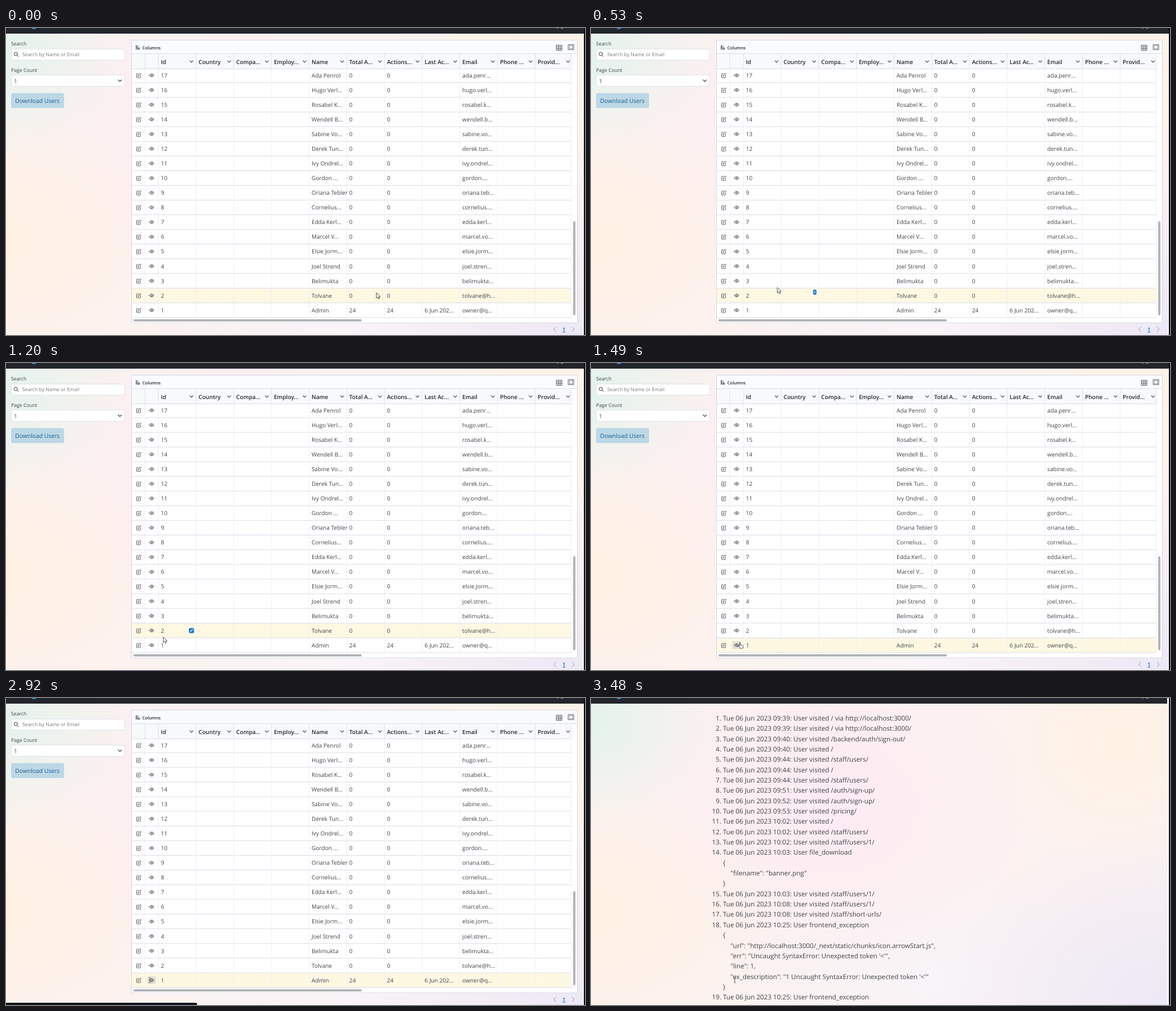
An HTML page for the animation above (3.88 s loop, 1027 by 545 pixels).

```html
<!DOCTYPE html>
<html lang="en">
<head>
<meta charset="utf-8">
<title>User activity</title>
<style>
html, body { margin: 0; width: 100%; height: 100%; overflow: hidden; }
#stage {
  position: relative; width: 1027px; height: 545px; overflow: hidden;
  background:
    radial-gradient(230px 190px at 0 40px, #e4f3ec, #e4f3ec00),
    radial-gradient(330px 230px at 0 380px, #fff0e2, #fff0e200),
    radial-gradient(380px 300px at 420px 190px, #fdebf3, #fdebf300),
    radial-gradient(260px 230px at 940px 80px, #fff2e4, #fff2e400),
    radial-gradient(420px 330px at 1027px 545px, #ece8f6, #ece8f600),
    radial-gradient(380px 200px at 620px 500px, #f8f4f8, #f8f4f800),
    #fcf2f0;
}
svg { position: absolute; left: 0; top: 0; }
text { font-family: "Open Sans", "Noto Sans", sans-serif; fill: #40434a; white-space: pre; text-rendering: geometricPrecision; }
.line { fill: none; stroke: #3a3d44; stroke-linecap: round; stroke-linejoin: round; }
.cell { font-size: 10.15px; }
.head { font-size: 10.15px; font-weight: 600; fill: #25282e; }
.small { font-size: 8.7px; }
.log { font-size: 11.67px; }

.users, .logs, .hover, .cursor, .arrow, .hand, .beam, .spot, .eyebg, .status, .logo, .pill {
  animation: 3880ms linear infinite;
}
.users { animation-name: users; }
.logs { animation-name: logs; }
.hover { animation-name: hover; }
.cursor { animation-name: move; }
.arrow { animation-name: arrow; }
.hand { animation-name: hand; }
.beam { animation-name: beam; }
.spot { animation-name: spot; }
.eyebg { animation-name: eyebg; }
.status { animation-name: bar; position: absolute; left: 0; top: 541px; height: 4px; background: #12141a; border-radius: 0 3px 0 0; }
.logo { animation-name: logo; }
.pill { transform-box: fill-box; transform-origin: center; }
.out { animation-name: pill-out; }
.in { animation-name: pill-in; }
.users, .logs, .hover, .arrow, .hand, .beam, .spot, .eyebg, .logo { animation-timing-function: step-end; }

@keyframes users { 0% { visibility: visible } 77.31%, 100% { visibility: hidden } }
@keyframes logs { 0% { visibility: hidden } 77.31%, 100% { visibility: visible } }
@keyframes hover {
  0% { transform: translateY(-26.06px) }
  3.34% { transform: translateY(-52.12px) }
  13.65% { transform: translateY(-26.06px) }
  32.7%, 100% { transform: none }
}
@keyframes move {
  0% { transform: translate(657px, 470px) }
  3.34% { transform: translate(657px, 470px); animation-timing-function: steps(2, jump-both) }
  6.95%, 13.64% { transform: translate(540px, 452px) }
  13.65% { transform: translate(330.5px, 460.5px); animation-timing-function: steps(7, jump-end) }
  26.02%, 29.37% { transform: translate(282px, 485px) }
  29.38% { transform: translate(281px, 486px); animation-timing-function: step-end }
  30.92% { transform: translate(279px, 486.5px); animation-timing-function: steps(6, jump-end) }
  42% { transform: translate(258px, 500px) }
  43.8% { transform: translate(258px, 500px); animation-timing-function: steps(5, jump-both) }
  52.82%, 100% { transform: translate(255px, 501px) }
}
@keyframes arrow { 0% { opacity: 1 } 38%, 100% { opacity: 0 } }
@keyframes hand { 0% { opacity: 0 } 38% { opacity: 1 } 69.84%, 100% { opacity: 0 } }
@keyframes beam { 0% { opacity: 0 } 69.84%, 100% { opacity: 1 } }
@keyframes eyebg { 0% { opacity: 0 } 38%, 100% { opacity: 1 } }
@keyframes spot { 0% { opacity: 0 } 49.2% { opacity: .85 } 69.84%, 100% { opacity: 0 } }
@keyframes logo { 0% { opacity: 1 } 77.31% { opacity: .12 } 78.6%, 100% { opacity: 1 } }
@keyframes bar {
  0% { opacity: 0; width: 107px }
  43.8% { opacity: 0; width: 107px; animation-timing-function: steps(3, jump-both) }
  49.2% { opacity: 1; width: 107px }
  69.84% { opacity: 1; width: 107px; animation-timing-function: steps(3, jump-both) }
  75.25% { opacity: 1; width: 339px }
  84.27% { opacity: 1; width: 339px; animation-timing-function: steps(3, jump-both) }
  89.68%, 100% { opacity: 0; width: 339px }
}
@keyframes pill-out {
  0%, 13.64% { transform: scaleX(0) }
  13.65% { transform: scaleX(.65); animation-timing-function: steps(2, jump-end) }
  17.2%, 100% { transform: scaleX(0) }
}
@keyframes pill-in {
  0% { transform: scaleX(0) }
  15.4% { transform: scaleX(0); animation-timing-function: steps(3, jump-end) }
  20.9%, 32.69% { transform: scaleX(1) }
  32.7%, 100% { transform: scaleX(0) }
}
</style>
</head>
<body>
<div id="stage">
  <svg class="users" width="1027" height="545" id="users"></svg>
  <svg class="logs" width="1027" height="545" id="logs"></svg>
  <svg width="1027" height="545" id="top"></svg>
  <div class="status"></div>
</div>
<script>
const FIRST_ROW = 501, ROW = 26.06, COL = 66.83;
const colX = i => 270.3 + i * COL;
const esc = s => String(s).replace(/&/g, '&amp;').replace(/</g, '&lt;');
const text = (x, y, s, cls, extra = '') => `<text x="${x}" y="${y}" class="${cls}" ${extra}>${esc(s)}</text>`;
const rect = (x, y, w, h, fill, extra = '') => `<rect x="${x}" y="${y}" width="${w}" height="${h}" fill="${fill}" ${extra}/>`;
const path = (d, w = 1, extra = '') => `<path class="line" d="${d}" stroke-width="${w}" ${extra}/>`;
const chevron = (x, y, r = 3) => path(`M${x - r} ${y - r / 2}l${r} ${r}l${r} ${-r}`, 1.1);

const people = [
  ['Admin', 'owner@q...'], ['Tolvane', 'tolvane@h...'], ['Belimukta', 'belimukta...'],
  ['Joel Strend', 'joel.stren...'], ['Elsie Jorm...', 'elsie.jorm...'], ['Marcel V...', 'marcel.vo...'],
  ['Edda Kerl...', 'edda.kerl...'], ['Cornelius...', 'cornelius....'], ['Oriana Tebler', 'oriana.teb...'],
  ['Gordon ...', 'gordon....'], ['Ivy Ondrel...', 'ivy.ondrel...'], ['Derek Tun...', 'derek.tun...'],
  ['Sabine Vo...', 'sabine.vo...'], ['Wendell B...', 'wendell.b...'], ['Rosabel K...', 'rosabel.k...'],
  ['Hugo Verl...', 'hugo.verl...'], ['Ada Penrol', 'ada.penr...']
];
const heads = ['Id', 'Country', 'Compa...', 'Employ...', 'Name', 'Total A...', 'Actions...', 'Last Ac...', 'Email', 'Phone ...', 'Provid...'];

const pill = (x, y, cls) => `<g class="pill ${cls}">${rect(x - 4.5, y - 4.5, 9, 9, '#1976cf', 'rx="2.6"')}
  <path d="M${x - 2} ${y + 2}l4 -4" stroke="#fff" stroke-width="1.2"/></g>`;

const editIcon = y => path(`M235 ${y - 3}h-2.3q-1.2 0 -1.2 1.2v4.8q0 1.2 1.2 1.2h4.8q1.2 0 1.2 -1.2v-2.2M234 ${y + 1.6}l.4 -1.8l3.8 -3.8l1.4 1.4l-3.8 3.8z`, .85);
const eyeIcon = y => path(`M254 ${y}q4.4 -5.6 8.8 0q-4.4 5.6 -8.8 0z`, .8) +
  `<circle class="line" cx="258.4" cy="${y}" r="1.5" stroke-width=".9"/>`;

function sidebar() {
  const box = 'stroke="#dfe2e8" rx="3"';
  return text(9, 30.5, 'Search', 'small') + text(9, 77.5, 'Page Count', 'small') +
    rect(9.5, 37.5, 201, 19.5, '#fff', box) + rect(9.5, 83.5, 201, 20, '#fff', box) +
    `<circle class="line" cx="17.3" cy="46" r="3"/>` + path('M19.6 48.4l2.2 2.3') +
    text(29, 50, 'Search by Name or Email', 'small', 'style="fill:#73777e"') +
    text(14, 97.5, '1', 'cell') + chevron(202, 93.5) +
    rect(9, 115.5, 94, 26.5, '#bcd7e5', 'rx="3.5"') +
    text(16.3, 132.7, 'Download Users', 'cell', 'style="fill:#1b6098;font-size:10.3px;font-weight:500"');
}

function toolbar() {
  return rect(222.5, 21.5, 791, 501.5, '#fafbfd', 'stroke="#d3d8e2"') +
    path('M230.5 32h4.5M230.5 34.5h3M230.5 37h2.5M231 31v7', .9) +
    `<circle class="line" cx="235.3" cy="36.6" r="1.5" stroke-width="1.1"/>` +
    text(241.7, 37.6, 'Columns', 'head', 'style="font-size:7.7px"') +
    path('M976.5 30.5h9.5v9h-9.5zM976.5 33h9.5M976.5 36.3h9.5M979.7 33v6.5M982.9 33v6.5', .8) +
    path('M997.5 29.5h9.5v9h-9.5zM999.4 33v-1.6h1.8M1005.1 33v-1.6h-1.8M999.4 35v1.6h1.8M1005.1 35v1.6h-1.8', .8);
}

function grid() {
  let s = rect(223, 46, 779, 26, '#f8f9fb') + rect(223, 72, 779, 442, '#fff') + rect(1002, 46, 11, 476, '#fff') + rect(223, 514, 790, 8.5, '#fff');
  s += `<g class="hover">${rect(223, FIRST_ROW - 13, 779, 26, '#fef8e3')}</g>`;
  s += `<g class="eyebg">${rect(250.5, 493.5, 15.5, 14.5, '#e4e1d6', 'rx="3"')}</g>`;
  const verticals = [246.5, ...heads.map((_, i) => colX(i)), 1002.5];
  s += path(verticals.map(x => `M${x} 72V514`).join(''), 1, 'style="stroke:#edf0f6"');
  s += path(verticals.map(x => `M${x} 46V72`).join(''), 1, 'style="stroke:#dce1ea"');
  s += path('M223 45.5H1013M223 72.5H1002' + people.map((_, i) => `M223 ${FIRST_ROW + 13 - i * ROW}H1002`).join(''), 1, 'style="stroke:#d8dde8"');
  heads.forEach((h, i) => {
    s += text(colX(i) + 4.4, 63.5, h, 'head') + chevron(i < 10 ? colX(i) + 58.7 : 997, 59.5, 2.8);
  });
  people.forEach(([name, mail], i) => {
    const y = FIRST_ROW - i * ROW, n = i ? 0 : 24;
    const put = (col, v) => text(colX(col) + 4.4, y + 3.7, v, 'cell');
    s += editIcon(y) + eyeIcon(y) + put(0, i + 1) + put(4, name) + put(5, n) + put(6, n) + put(8, mail);
    if (!i) s += put(7, '6 Jun 202...');
  });
  s += pill(397, 469, 'out') + pill(329, 475, 'in');
  s += rect(1006, 343, 4, 167, '#b3b4b7', 'rx="2"') + rect(226, 517, 405, 4, '#b3b4b7', 'rx="2"');
  return s;
}

function pager() {
  return path('M975.5 531l-4 4l4 4M1004 531l4 4l-4 4', 1, 'style="stroke:#9a9da5"') +
    text(986.7, 538.5, '1', 'head', 'style="fill:#1976cf;text-decoration:underline"');
}

const site = 'http://localhost:3000/';
const events = [
  ['09:39', '/ via ' + site], ['09:39', '/ via ' + site], ['09:40', '/backend/auth/sign-out/'], ['09:40', '/'],
  ['09:44', '/staff/users/'], ['09:44', '/'], ['09:44', '/staff/users/'], ['09:51', '/auth/sign-up/'],
  ['09:52', '/auth/sign-up/'], ['09:53', '/pricing/'], ['10:02', '/'], ['10:02', '/staff/users/'],
  ['10:02', '/staff/users/1/'], ['10:03', 'file_download', ['"filename": "banner.png"']],
  ['10:03', '/staff/users/1/'], ['10:08', '/staff/users/1/'], ['10:08', '/staff/short-urls/'],
  ['10:25', 'frontend_exception', [
    `"url": "${site}_next/static/chunks/icon.arrowStart.js",`,
    `"err": "Uncaught SyntaxError: Unexpected token '<'",`,
    '"line": 1,',
    `"ex_description": "1 Uncaught SyntaxError: Unexpected token '<'"`
  ]],
  ['10:25', 'frontend_exception']
];

function logList() {
  let s = '', y = 39.8;
  const put = (x, v, extra) => { s += text(x, y, v, 'log', extra); };
  const next = () => { y += 18.35; };
  events.forEach(([time, what, body], i) => {
    put(231, i + 1 + '.', 'text-anchor="end"');
    put(234, `Tue 06 Jun 2023 ${time}: User ${what[0] === '/' ? 'visited ' : ''}${what}`);
    next();
    if (!body) return;
    put(234, '{'); next();
    body.forEach(line => { put(247.5, line); next(); });
    put(234, '}'); next();
  });
  return s;
}

const cursor = `<g class="cursor">
  <circle class="spot" cx="-.5" cy="1" r="8.3" fill="#f1e42c"/>
  <path class="arrow" d="M0 0v9.6l2.3 -2l1.6 3.4l1.5 -.7l-1.5 -3.3h3z" fill="#fff" stroke="#222" stroke-width=".8"/>
  <path class="hand" d="M-1.5 1q1 -1 1.6 0v4l3.6 .7q1.5 .3 1.2 2l-.8 3.3h-4.6l-3 -4q.2 -1.2 2 0z" fill="#fff" stroke="#222" stroke-width=".8"/>
  <path class="beam" d="M-1.6 -4.2h3.2M0 -4.2v8.4M-1.6 4.2h3.2" stroke="#555" stroke-width=".9"/>
</g>`;

const get = id => document.getElementById(id);
get('users').innerHTML = rect(0, 0, 1025, 10, '#23252c') + sidebar() + toolbar() + grid() + pager() + rect(1024, 10, 1, 535, '#fff');
get('logs').innerHTML = rect(1022, 0, 3, 545, '#fff') + rect(0, 0, 1022, 10, '#23252c') + logList();
get('top').innerHTML = rect(46, 0, 7, 1.6, '#2f9be0', 'class="logo"') +
  path('M977 0q1.500 1 3 0M984 0q2.500 1.500 5 0', .9, 'style="stroke:#c9ccd2"') +
  rect(1025, 0, 2, 545, '#08090c') + cursor;
</script>
</body>
</html>
```
